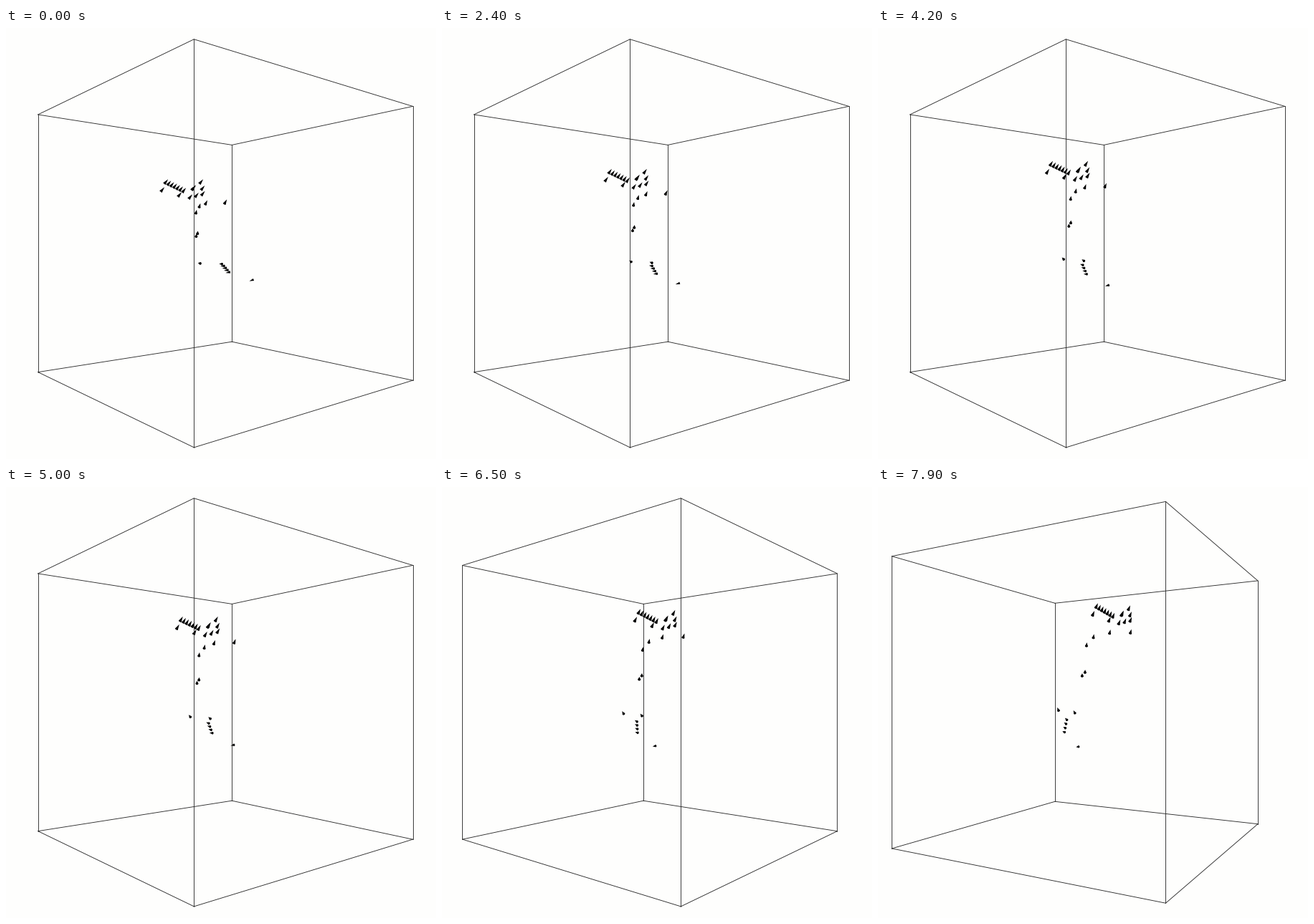
Recreate the animation shown at these times as a matplotlib script. Size 600 by 602 pixels, loop 8000 ms.

```python
import numpy as np
import matplotlib.pyplot as plt
from matplotlib.animation import FuncAnimation
from matplotlib.collections import PolyCollection

W, H, DPI = 600, 602, 100
STEP, COUNT = 100, 80               # ms per frame, frames per loop
CX, CY = 297.5, 300.3
FOCAL, DIST = 747.3, 4.03
TICK, LAG = 260, 10                 # the swarm moves on once per tick
SPAN = 22 * TICK                    # time in which a boid makes its FLOW move
SPEED = 0.034                       # world units per second
FIRST, TURN = -5.08, 10.1           # camera angle and size of one turn
TURN_TIMES = (6500, 7700)


def strand(n, *points):
    """n boids evenly spaced along a line through the points."""
    p = np.array(points, float)
    run = np.r_[0, np.cumsum(np.hypot(*np.diff(p, axis=0).T))]
    s = np.linspace(0, run[-1], n)
    return np.column_stack([np.interp(s, run, p[:, k]) for k in (0, 1)])


start = np.vstack([
    strand(7, (223, 214), (248, 226)),
    strand(2, (218, 225), (242, 232)),
    strand(2, (261, 223), (262, 222)),
    strand(5, (272, 214), (276, 230), (257, 235)),
    strand(1, (306, 242)),
    strand(3, (279, 243), (270, 247), (265, 256)),
    strand(2, (267, 285), (265, 289)),
    strand(1, (269, 328)),
    strand(5, (299, 329), (309, 341)),
    strand(1, (342, 352)),
])

# The swarm streams along a ribbon, so height decides all the rest:
# y, move in x, move in y, depth, sag of the path
FLOW = np.array([
    (236, 24, -35, 0.64, 0),
    (246, 8, -29, 0.29, 0),
    (258, 4, -26, 0.26, 0),
    (287, 2, -20, 0.25, 0),
    (328, -15, -11, -0.02, 7),
    (331, -23, -5, -0.17, 6),
    (352, -30, 9, -0.45, 4),
])
dx, dy, depth, sag = (np.interp(start[:, 1], FLOW[:, 0], col)
                      for col in FLOW.T[1:])


def project(x, y, z, degrees):
    a = np.radians(degrees)
    c, s = np.cos(a), np.sin(a)
    scale = FOCAL / (DIST - (z * c - x * s))
    return np.stack([CX + scale * (x * c + z * s), CY + scale * y], -1), scale


def boids(ms, degrees):
    u = ms / SPAN
    ease = u * (1 - u)
    x = start[:, 0] + dx * (u + 0.2 * ease) - CX
    y = start[:, 1] + dy * u + sag * ease - CY
    unit = (DIST - depth) / FOCAL
    return project(x * unit, y * unit, depth, degrees - FIRST)


RIM = np.linspace(0, 2 * np.pi, 14, endpoint=False)


def cones(ms, degrees):
    """Each cone is a triangle and the ellipse of its base."""
    here, scale = boids(ms, degrees)
    vel = (boids(ms + 100, degrees)[0] - here) * 10
    polys = []
    for p, v, s in zip(here, vel, scale):
        pace = max(np.hypot(*v), 1e-6)
        d = v / pace
        side = np.array([-d[1], d[0]])
        lean = np.clip(pace / (s * SPEED), 0.45, 1)
        r, half = 0.01 * s, 0.019 * s * lean
        base, tip = p - d * half, p + d * half
        squash = r * np.sqrt(1 - lean ** 2)
        polys.append([tip, base + side * r, base - side * r])
        polys.append(base + np.outer(np.cos(RIM) * r, side)
                     + np.outer(np.sin(RIM) * squash, d))
    return polys


def box_edges():
    corner = [np.sqrt(2) * np.array([np.sin(a), np.cos(a)])
              for a in np.arange(4) * np.pi / 2]
    edges = []
    for (x, z), (nx, nz) in zip(corner, corner[1:] + corner[:1]):
        edges += [((x, y, z), (nx, y, nz)) for y in (-1, 1)]
        edges.append(((x, -1, z), (x, 1, z)))
    return np.array(edges)


EDGES = box_edges()

fig = plt.figure(figsize=(W / DPI, H / DPI), dpi=DPI, facecolor="#fefefd")
ax = fig.add_axes([0, 0, 1, 1])
ax.set_xlim(-0.5, W - 0.5)
ax.set_ylim(H - 0.5, -0.5)
ax.axis("off")
lines = [ax.plot([], [], color="#2c2c2c", lw=0.65)[0] for _ in EDGES]
swarm = ax.add_collection(PolyCollection([], facecolors="black",
                                         edgecolors="none"))


def draw(i):
    ms = i * STEP
    angle = FIRST + TURN * sum(ms >= t for t in TURN_TIMES)
    ends, _ = project(*np.moveaxis(EDGES, -1, 0), angle)
    for line, e in zip(lines, ends):
        line.set_data(e[:, 0], e[:, 1])
    swarm.set_verts(cones((ms + LAG) // TICK * TICK, angle))
    return [*lines, swarm]


anim = FuncAnimation(fig, draw, frames=COUNT, interval=STEP, repeat=True,
                     repeat_delay=0, blit=False)
plt.show()
```
